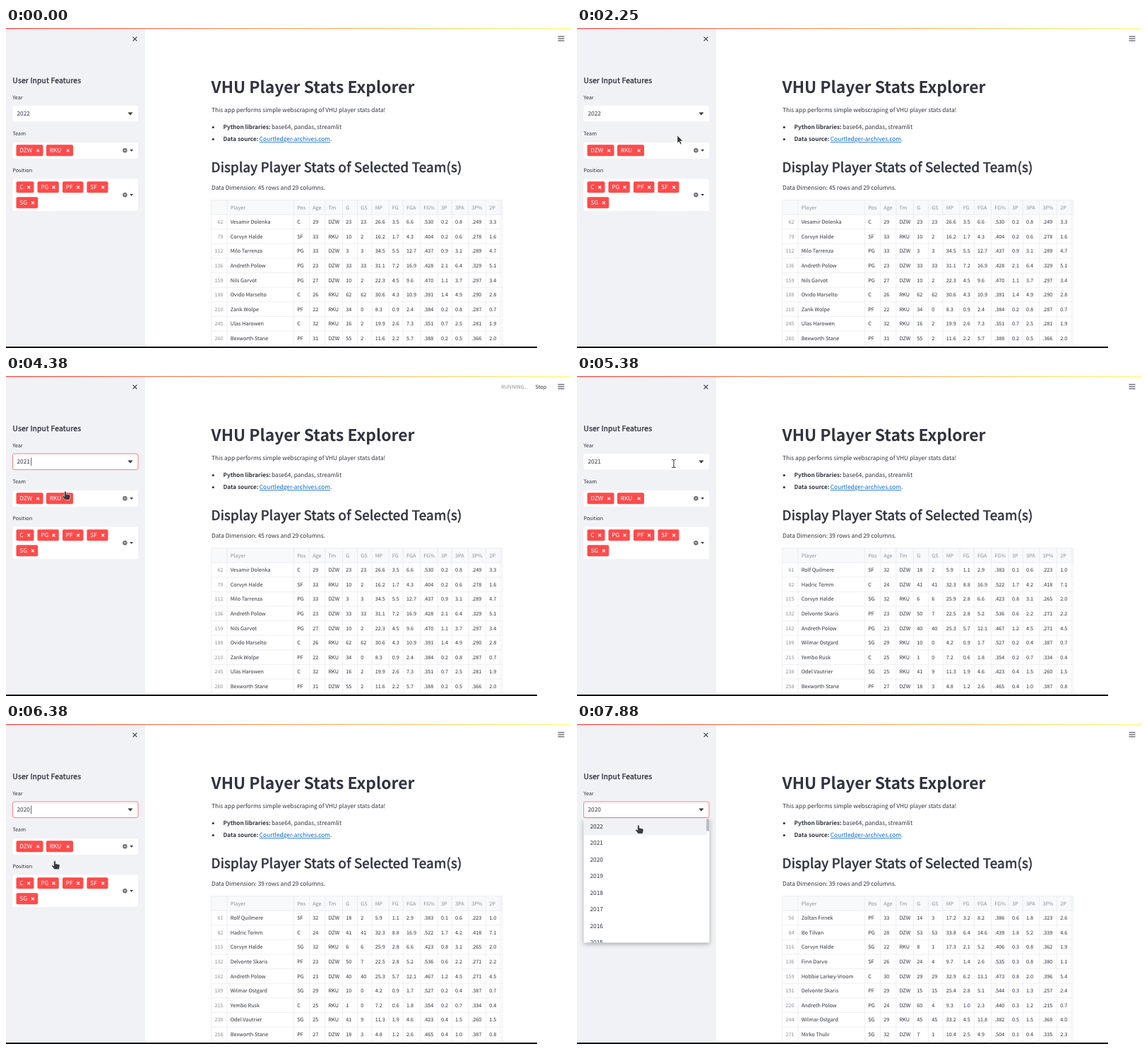
An HTML page that plays this animation: 800 by 453 pixels, repeating every 8000 ms.

```html
<!DOCTYPE html>
<html lang="en">
<head>
<meta charset="utf-8">
<title>Player Stats Explorer</title>
<style>
  html, body { margin: 0; width: 100%; height: 100%; overflow: hidden; background: #fff; }
  #stage { display: block; width: 800px; height: 453px; }
  text {
    font-family: "Noto Sans CJK JP", "Noto Sans CJK SC", "Noto Sans CJK KR", "Noto Sans CJK", "Open Sans", sans-serif;
    fill: #31333f; white-space: pre; text-rendering: geometricPrecision;
  }
  .bold { font-weight: 700; }
  .semi { stroke: #31333f; stroke-width: .032em; letter-spacing: .012em; }
  .white { fill: #fff; }
  .muted { fill: #8d909b; }
  .link { fill: #0068c9; text-decoration: underline; }
  #year { stroke-width: .7; }
  #menu { filter: drop-shadow(0 2px 3px rgba(0, 0, 0, .3)); }
</style>
</head>
<body>
<svg id="stage" viewBox="0 0 800 453" xmlns="http://www.w3.org/2000/svg">
  <defs>
    <linearGradient id="glow"><stop stop-color="#ff4b4b"/><stop offset="1" stop-color="#fffd80"/></linearGradient>
  </defs>
  <g id="main"></g>
  <g id="side"></g>
  <g id="top"></g>
</svg>
<script>
const STEP = 125, LOOP = 8000;
const BODY = 8.34, SMALL = 7.29, INK = '#31333f', RED = '#ff4b4b';
const $ = id => document.getElementById(id);
const range = n => [...Array(n).keys()];

// Text is placed by the middle of its capitals.
const text = (x, y, s, size = BODY, cls = '', anchor = 'start') =>
  `<text x="${x}" y="${(y + size * .367).toFixed(2)}" font-size="${size}" class="${cls}" text-anchor="${anchor}">${s}</text>`;
const rect = (x, y, w, h, fill, rx = 0, more = '') =>
  `<rect x="${x}" y="${y}" width="${w}" height="${h}" fill="${fill}" rx="${rx}" ${more}/>`;
const path = (d, stroke, width = 1, fill = 'none') =>
  `<path d="${d}" stroke="${stroke}" stroke-width="${width}" fill="${fill}"/>`;
const cross = (x, y, r, color, width) =>
  path(`M${x - r} ${y - r}l${2 * r} ${2 * r}m0 ${-2 * r}l${-2 * r} ${2 * r}`, color, width);
const caretDown = (x, y, r) => path(`M${x - r} ${y - r / 2}h${2 * r}l${-r} ${r * 1.15}z`, 'none', 0, INK);

// Stats table

const HEAD = 'Player Pos Age Tm G GS MP FG FGA FG% 3P 3PA 3P% 2P'.split(' ');
const COLS = [313, 407.5, 429.5, 451.8, 476.5, 497.5, 518, 542, 562.3, 586.5, 611.3, 631.3, 654.5, 679.5];
const LEFT = 290.7, RIGHT = 702.5, TOP = 243.7, ROW = 20.58;

const ROSTERS = {
  2022: `Vesamir Dolenka,C,DZW/Corvyn Halde,SF,RKU/Milo Tarrenza,PG,DZW/Andreth Polow,PG,DZW/Nils Garvot,PG,DZW/
Ovido Marselto,C,RKU/Zarik Wolpe,PF,RKU/Ulas Harowen,C,RKU/Bexworth Stane,PF,DZW`,
  2021: `Rolf Quilmere,SF,DZW/Hadric Tomm,C,DZW/Corvyn Halde,SG,RKU/Delvonte Skaris,PF,DZW/Andreth Polow,PG,DZW/
Wilmar Ostgard,SG,RKU/Yembo Rusk,C,RKU/Odel Vautrier,SG,RKU/Bexworth Stane,PF,DZW`,
  2020: `Zoltan Firnek,PF,DZW/Bo Tilvan,PG,DZW/Corvyn Halde,SG,RKU/Finn Darvo,SF,DZW/Hobbie Larkey-Vroom,C,DZW/
Delvonte Skaris,PF,DZW/Andreth Polow,PG,DZW/Wilmar Ostgard,SG,RKU/Mirko Thulv,SG,DZW`
};

const seeded = seed => () => (seed = (seed * 16807) % 2147483647) / 2147483647;
const percent = (made, tried) => tried ? (made / tried).toFixed(3).replace(/^0/, '') : '0';

// One plausible season line; makes never exceed attempts.
function statLine(rnd) {
  const between = (a, b) => a + (b - a) * rnd();
  const games = Math.ceil(between(0, 70)), minutes = between(3, 35);
  const starts = minutes > 25 ? games : Math.floor(between(0, games / 4));
  const tried = minutes * between(.2, .55), made = tried * between(.35, .55);
  const tried3 = tried * between(.05, .55), made3 = Math.min(made, tried3 * between(.2, .42));
  const one = v => v.toFixed(1);
  return {
    age: Math.floor(between(21, 34)),
    stats: [games, starts, one(minutes), one(made), one(tried), percent(made, tried),
      one(made3), one(tried3), percent(made3, tried3), one(made - made3)]
  };
}

const cells = (list, y, cls) => list.map((s, i) => text(COLS[i] + 4.7, y, s, SMALL, cls)).join('');

function season(year, size) {
  const rnd = seeded(year * 7919);
  const rows = ROSTERS[year].split('/').map((entry, i) => {
    const [name, pos, team] = entry.trim().split(',');
    const { age, stats } = statLine(rnd), y = TOP + ROW * (i + 1.5);
    const index = Math.floor(50 + 26 * i + 15 * rnd());
    return text(307.5, y, index, SMALL, 'muted', 'end') + cells([name, pos, age, team, ...stats], y, '');
  });
  return `<g id="s${year}">` + text(291, 226, `Data Dimension: ${size} rows and 29 columns.`) + rows.join('') + '</g>';
}

const grid = () =>
  rect(LEFT, TOP, RIGHT - LEFT, ROW, '#f8f9fb') +
  path(range(11).map(i => `M${LEFT} ${TOP + i * ROW}H${RIGHT}`).join('') +
    [LEFT, ...COLS, 700, RIGHT].map(x => `M${x} ${TOP}v${10 * ROW}`).join(''), '#e8e9ee', .7);

// Main page

const bullet = (y, label, x, s) => `<circle cx="293.3" cy="${y + .2}" r="1.6" fill="${INK}"/>` +
  text(307.5, y, label, 8.2, 'bold') + text(x, y, s);

$('main').innerHTML =
  text(290.5, 84, 'VHU Player Stats Explorer', 22.9, 'bold') +
  text(291, 116.2, 'This app performs simple webscraping of VHU player stats data!') +
  bullet(140.3, 'Python libraries:', 376, 'base64, pandas, streamlit') +
  bullet(157.3, 'Data source:', 358.8, '<tspan class="link">Courtledger-archives.com</tspan>.') +
  text(290.5, 197, 'Display Player Stats of Selected Team(s)', 18.8, 'semi') +
  grid() + cells(HEAD, 254, 'muted') +
  season(2022, 45) + season(2021, 39) + season(2020, 39);

// Sidebar

const MENU_TOP = 133.7, ITEM = 23.5;

const tag = (x, y, w, s) => rect(x, y - 8, w, 16, RED, 2) +
  text(x + 4.8, y, s, BODY, 'white') + cross(x + w - 7.3, y + .2, 1.9, '#fff', 1.1);
const field = (y, h, more) => rect(9.5, y, 177.5, h, '#fff', 2.3, more);
const clearIcon = y => `<circle cx="168.4" cy="${y}" r="3.2" fill="#6c6e78"/>` +
  cross(168.4, y, 1.1, '#fff', .8) + caretDown(177.7, y, 2.4);

$('side').innerHTML =
  rect(0, 0, 197, 453, '#f0f2f6') +
  cross(182.5, 15.5, 2.9, INK, 1.1) +
  text(9.3, 74.5, 'User Input Features', 10.42, 'semi') +
  text(9.3, 98, 'Year', SMALL) + field(110, 22.6, 'id="year"') +
  text(15.5, 121.4, '<tspan id="value"></tspan>') +
  rect(35.4, 115.5, .8, 11.5, INK, 0, 'id="caret"') + caretDown(176, 121.2, 3.5) +
  text(9.3, 149.6, 'Team', SMALL) + field(162, 23) +
  tag(14.5, 173.3, 38, 'DZW') + tag(57, 173.3, 38, 'RKU') + clearIcon(173.3) +
  text(9.3, 201.6, 'Position', SMALL) + field(213.4, 45.6) +
  tag(14.5, 225.2, 25, 'C') + tag(44.5, 225.2, 30.3, 'PG') + tag(80, 225.2, 29.5, 'PF') +
  tag(114.5, 225.2, 30, 'SF') + tag(14.5, 247.2, 30.7, 'SG') + clearIcon(236.2) +
  '<g id="menu">' + rect(9.5, MENU_TOP, 178, 175.8, '#fff', 1.5) +
  `<svg x="9.5" y="${MENU_TOP}" width="178" height="175.8">` +
  rect(0, 0, 174.5, ITEM, '#f0f2f6', 0, 'id="hover"') +
  range(8).map(i => text(9, 11 + ITEM * i, 2022 - i)).join('') +
  rect(173.7, .6, 4, 17.5, '#b8babf', 1.5, 'id="thumb"') + '</svg></g>';

// Window chrome and pointers

const SHAPES = {
  arrow: path('M0 0V11L2.5 8.8 4.3 12.8 6.2 12 4.4 8.1H7.8Z', '#fff', .6, '#333'),
  beam: path('M-3-5.5Q0-5.5 0-4.5Q0-5.5 3-5.5M0-4.5V4.5M-3 5.5Q0 5.5 0 4.5Q0 5.5 3 5.5', '#4a4b52', 1.2),
  hand: path('M-1.3 1Q0-.8 1.3 1V4.2L6 5.2Q7.4 5.7 7.1 7.6L6 12.3H-.4L-4.3 7.6Q-4.4 6-2.8 6.4L-1.3 7.6Z', '#fff', .5, '#3a3b40')
};

$('top').innerHTML =
  rect(0, 0, 800, 1.3, 'url(#glow)') +
  path('M781.5 12h9M781.5 15h9M781.5 18h9', INK, 1.2) +
  '<g id="status">' + text(701, 15.2, 'RUNNING...', SMALL, 'muted') + text(749.5, 15.2, 'Stop', SMALL) + '</g>' +
  rect(796.3, 27, 3.7, 284, '#b9b9bb', 1.8, 'id="scroll"') +
  rect(0, 451, 752, 2, '#000') +
  '<g id="pointer"></g>';

// Pointer stops: step, x, y and the shape shown from there on
const STOPS = [
  [2, 330, 440, 'arrow'], [7, 239, 127, 'arrow'], [13, 14, 200, 'arrow'], [15, 568, 42, 'arrow'],
  [18, 142, 152, 'arrow'], [19, 16, 226, 'arrow'], [21, 165, 120, 'beam'], [28, 158, 116, 'beam'],
  [31, 84, 163, 'hand'], [35, 84, 163, 'hand'], [43, 137, 124, 'beam'], [47, 69, 193.5, 'hand'],
  [52, 69, 193.5, 'hand'], [58, 140, 121, 'beam'], [63, 87, 143, 'hand']
];

// Each visit to the year list: when it opens, a year is picked, focus is lost
const VISITS = [
  { open: 24, pick: 33, blur: 40 },
  { open: 45, pick: 51, blur: 58 },
  { open: 60, pick: 64, blur: 64 }
];

const show = (id, on) => { $(id).style.display = on ? '' : 'none'; };

function pointerAt(n) {
  const i = STOPS.findLastIndex(stop => stop[0] <= n);
  if (i < 0) return null;
  const [n0, x0, y0, shape] = STOPS[i], [n1, x1, y1] = STOPS[i + 1] || STOPS[i];
  const k = n1 > n0 ? (n - n0) / (n1 - n0) : 0;
  return { x: x0 + (x1 - x0) * k, y: y0 + (y1 - y0) * k, shape };
}

function render(n) {
  const during = (from, to) => VISITS.some(v => n >= from(v) && n < to(v));
  const picks = delay => VISITS.filter(v => n >= v.pick + delay).length;
  const focus = during(v => v.open, v => v.blur);
  const pointer = pointerAt(n);

  for (const y of [2022, 2021, 2020]) show('s' + y, y === 2022 - picks(5));
  $('value').textContent = 2022 - picks(0);
  $('year').setAttribute('stroke', focus ? RED : 'none');
  show('caret', focus && (n + 7) % 8 < 4);
  show('menu', during(v => v.open, v => v.pick));
  show('thumb', n > VISITS[2].open);
  show('status', during(v => v.pick + 2, v => v.pick + 5));
  show('scroll', n > 2 && n < 13);

  const row = pointer && pointer.shape === 'hand' ? Math.floor((pointer.y - MENU_TOP) / ITEM) : 0;
  $('hover').setAttribute('y', Math.max(0, row) * ITEM);
  $('pointer').innerHTML = pointer ? SHAPES[pointer.shape] : '';
  if (pointer) $('pointer').setAttribute('transform', `translate(${pointer.x} ${pointer.y})`);
}

function tick() {
  render(Math.floor(performance.now() % LOOP / STEP));
  requestAnimationFrame(tick);
}
tick();
</script>
</body>
</html>
```
